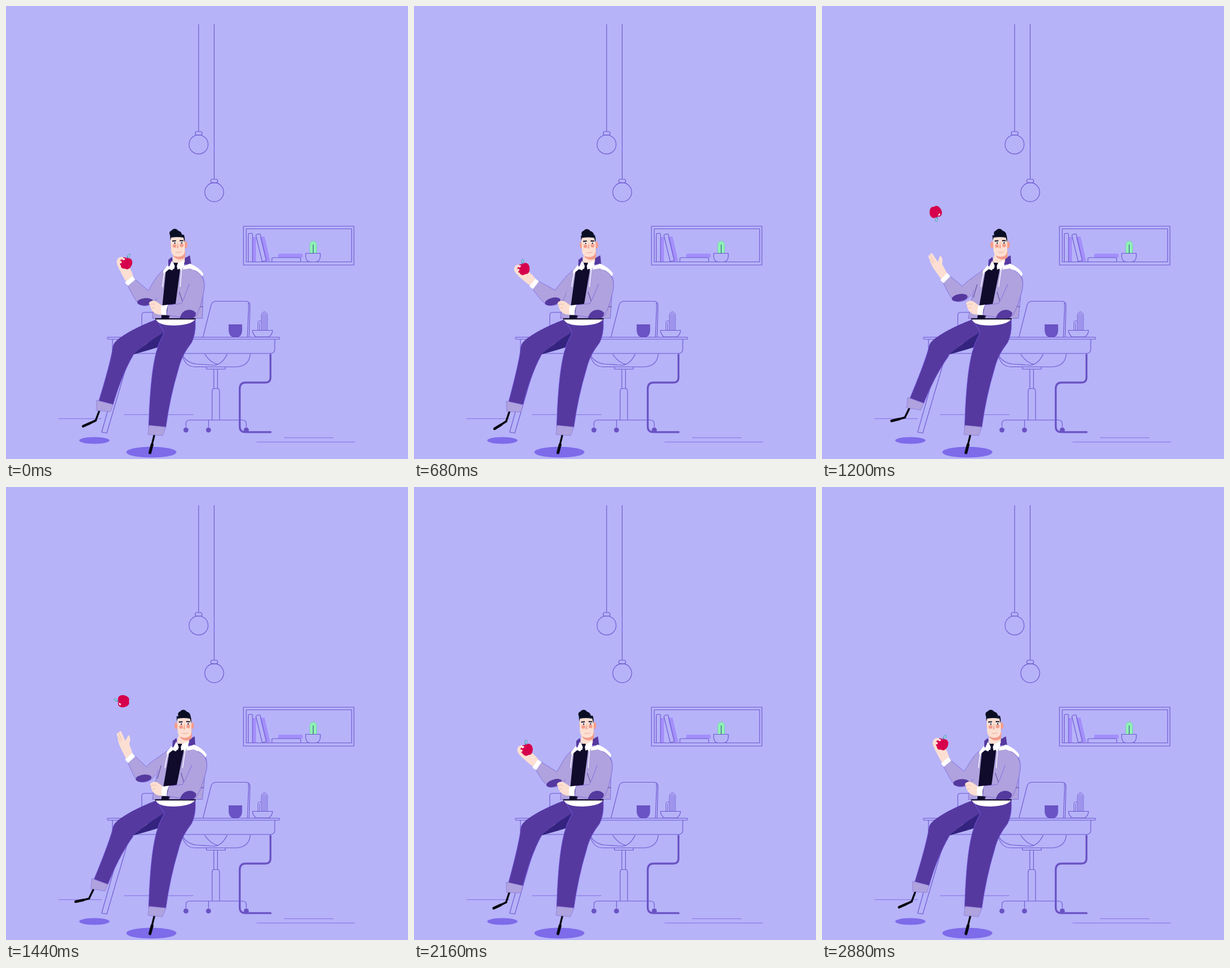
Recreate the animation shown at these times as an HTML page. Size 706x794 px, loop 2920 ms.

```html
<!DOCTYPE html>
<html lang="en">
<head>
<meta charset="utf-8">
<title>Apple toss</title>
<style>
  html, body { margin: 0; width: 100%; height: 100%; overflow: hidden; background: #b6b3f9; }
  svg { display: block; width: 100vw; height: 100vh; }
  .line { fill: none; stroke: #6f59d0; stroke-width: 1.15; stroke-linejoin: round; }
  .thin { fill: none; stroke: #8570e2; stroke-width: 1.1; }
  .solid { fill: #6a53c4; }
  .book { fill: #a48ffb; }
  .shade { fill: #7d6bea; }
  .pants { fill: #55399f; }
  .leg { fill: #55399f; stroke: #7659dd; stroke-width: .9; }
  .coat { fill: #afa2de; stroke: #7a62dd; stroke-width: .8; }
  .fold { fill: none; stroke: #4b3990; stroke-width: .9; }
  .hem { fill: #afa2de; stroke: #8d7bdb; stroke-width: .8; }
  .white { fill: #fff; }
  .skin { fill: #fcdfd2; }
  .blush { fill: #f39c8b; }
  .ink { fill: #100a2b; }
  .shoe { fill: none; stroke: #07060f; stroke-linecap: round; stroke-linejoin: round; }
  .finger { fill: none; stroke: #fcdfd2; stroke-width: 4.2; stroke-linecap: round; }
</style>
</head>
<body>
<svg viewBox="0 0 706 794" preserveAspectRatio="none">
  <rect width="706" height="794" fill="#b6b3f9"/>

  <!-- lamps -->
  <g class="line">
    <path d="M338.3 32V220M365.6 32V303.500"/>
    <rect x="332.300" y="220" width="12" height="6.500" rx="3"/>
    <circle cx="338.200" cy="242.700" r="16.700"/>
    <rect x="359.700" y="303.500" width="12" height="6.500" rx="3"/>
    <circle cx="365.700" cy="326.300" r="16.600"/>
  </g>

  <!-- shelf -->
  <path class="book" d="M433 405H439V448H433ZM446 405L454 404L464 447L457 448ZM480 434H519Q521 434 521 436V441H478V436Q478 434 480 434Z"/>
  <g class="line">
    <path d="M417 386H611V454H417ZM422 390.500H607V448.500H422Z"/>
    <path d="M425.500 448V401Q425.500 398.500 428 398.500H431Q433 398.500 433 401V448M439 403Q438.500 401 441 400.300L444 399.500Q446 399 446.700 401L457 446L450 448ZM467 448V443Q467 441 469 441H515Q517.500 441 517.500 443V448"/>
    <path d="M533.500 433.500V418A6 6 0 0 1 545.500 418V433.500" style="fill:#8ff2b6;stroke:#6fc9ae;stroke-width:.8"/>
    <path d="M539.500 418V433" style="stroke:#3e4f86"/>
    <path d="M526.300 433.500H552V439Q551 448.500 543 448.500H535Q527 448.500 526.300 439Z"/>
  </g>

  <!-- floor -->
  <path class="thin" d="M92 723.300H168M207 716.300H329M440 764.300H613M488 756.700H575"/>
  <ellipse class="shade" cx="155.200" cy="761.500" rx="26.500" ry="5.900"/>
  <ellipse class="shade" cx="255.300" cy="782" rx="44" ry="9.500"/>

  <!-- chair -->
  <g class="line">
    <path d="M346 580L360 525Q362 517.500 369 517.500H421Q428.500 517.500 428.500 525L427 580M425.500 520Q426.500 523 426 530L424 580"/>
    <path d="M309 610Q314 632.500 332 632.500H402Q427 632.500 429 610M309 610Q316 625 334 627.500L366 629.500Q380 628 388.500 610M349 610Q358 625 373 628.500"/>
    <path d="M352 633V636.500H385V633M365 637V671M371.500 637V671M362 725.500V675Q362 670.500 366 670.500H371Q375 670.500 375 675V725.500"/>
    <path d="M316 738V732Q316 725.700 323 725.700H415Q422 725.700 422 732V738M355.600 726V738"/>
  </g>
  <g class="solid">
    <circle cx="316" cy="743.200" r="4.400"/><circle cx="355.600" cy="743.200" r="4.400"/><circle cx="422" cy="743.200" r="4.400"/>
  </g>

  <!-- desk -->
  <g class="line">
    <rect x="178" y="580.500" width="302.500" height="3.500" rx="1.500"/>
    <path d="M187 584V609H464Q472 609 472 601V584"/>
    <path d="M207 609L168 747L177 748.500L218 609M238.500 580V542Q238.500 537 243.500 537H262"/>
    <path d="M433 568.500H468Q468 575 462 580H439Q433 575 433 568.500Z"/>
    <path style="stroke-width:.9" d="M442.500 568V554Q445.500 549 448.500 554V568M445.500 568V555M448.500 556V540Q453.700 532 459 540V568M451 568V541Q453.700 537 456.500 541V568M453.700 541V568"/>
    <path style="stroke:#6a53c4;stroke-width:3.300" d="M464.500 610V651Q464.500 660 455 660H421Q410.500 660 410.500 671V737Q410.500 746.800 420 746.800H466"/>
  </g>
  <path class="solid" d="M391 558H414.700V569Q414 580.500 405 580.500H401Q392 580.500 391 569Z"/>

  <!-- legs -->
  <g id="shin">
    <g id="foot">
      <path class="shoe" stroke-width="3.600" d="M157.500 726.500L148 731"/>
      <path class="shoe" stroke-width="4.600" d="M148 731L135.500 736.500"/>
    </g>
    <path class="shoe" stroke-width="3.400" d="M164 709L157.500 726.500"/>
    <path class="leg" d="M187.500 599C185 616 176 650 163 692L188 699C196 671 208 638 224 611L215 590Z"/>
    <path class="hem" d="M159 691L188 698.500L184 711L159 709Z"/>
  </g>
  <path class="leg" d="M266 549C236 560 205 576 193 588Q188 593 187.300 601"/>
  <path class="pants" d="M266 549C236 560 205 576 193 588C186 595 186 606 190 616Q206 620 223 611L246 592L280 573L300 552Z"/>
  <path fill="#34237f" d="M223 611Q244 592 279 571L271 597Z"/>
  <path class="shoe" stroke-width="3.300" d="M261 750L256 770"/>
  <path class="shoe" stroke-width="5" d="M256.500 769L252.800 783"/>
  <path class="leg" d="M264 549H332.500Q334 575 326 590C319 600 309 612 303 636Q288 685 280.500 740L250.500 738C252 690 255 640 264 606Q268 590 278 572Z"/>
  <path class="hem" d="M251 735L281 738L275 753L249.500 751Z"/>

  <!-- torso -->
  <g id="torso">
    <path class="white" d="M263 549H332Q327 558.500 297 560Q268 560.500 263 549Z"/>
    <path class="pants" d="M291 440L285 445L285 459L296 452ZM312 443L323 437L325.500 455L312 459Z"/>
    <path class="skin" d="M296 430H314L314 449L301 455L292 447Z"/>
    <path class="coat" d="M284 456C270 466 264 480 262 500L257 547.500H345L346 505C350 490 349 475 339 466L318 453Z"/>
    <path class="white" d="M291 447L286 459L290 466H304L313 456L313 448L300 454Z"/>
    <path class="ink" d="M281 462L291 459L299 463L306 460L298 521L285 549H272.500L275 521Z"/>
    <path class="white" d="M284 454L276 464L276.500 469.500L288 460ZM312 456L323 451.500Q339 458 346.500 469L345 474Q335 464 323 460L310 462Z"/>
    <path class="white" d="M290 450L286 461L292 463.500L298 453ZM299 452L306 462L313 454L312 446Z"/>
    <path class="ink" d="M294 450H302L300 456L302 466H294L296.500 456Z"/>
    <path class="ink" d="M262 547.300H333V549.500H262Z"/>
    <path class="fold" d="M268 488L263 511M304 501L311 520M336 527H346"/>
    <path d="M279 465Q276 477 275 492M308.500 461Q307 477 306 492" fill="none" stroke="#fff" stroke-width="1.300" stroke-linecap="round"/>
  </g>

  <!-- head -->
  <g id="head">
    <ellipse id="ear" class="blush" cy="418.500" rx="3.200" ry="5.500"/>
    <ellipse class="blush" cx="315.300" cy="418.500" rx="3.300" ry="6"/>
    <path class="blush" d="M293 434L315 428L314.500 441Q305 448 295 440Z"/>
    <path class="skin" d="M288.700 403H314V429C314 436 309 439.500 302.500 439.500C295 439.500 291 436 290 429Z"/>
    <circle class="blush" cx="296" cy="420.500" r="3.300"/>
    <circle class="blush" cx="308.500" cy="419.500" r="3.300"/>
    <path d="M302 413L300 424L303 425Z" fill="#f3a58f"/>
    <path d="M298 431.500Q303 433 308 431" fill="none" stroke="#e9a18f" stroke-width=".9"/>
    <circle class="white" cx="296.500" cy="415.300" r="2"/><circle class="white" cx="308.500" cy="415" r="2"/>
    <circle class="ink" cx="296.500" cy="415.500" r="1.200"/><circle class="ink" cx="308.500" cy="415.200" r="1.200"/>
    <path d="M292 412L298.500 411.500M305 411.200L311.500 411.500" stroke="#0f1128" stroke-width="2"/>
    <path fill="#0f1630" d="M288.700 411L288 402Q300 399 312.500 401Q314 404 314 410L313.500 414L311.500 406Q301 404 290 406Z"/>
    <path id="quiff" fill="#0a0e22" d="M289 403C285 398 288 394 291 393.500C293 389.500 300 389 302.500 394C307 395 309 398 309 402Q299 405 289 403Z"/>
  </g>

  <!-- raised arm -->
  <path id="sleeve" class="coat"/>
  <ellipse id="patch" class="pants" rx="14" ry="6.400"/>
  <g id="palm">
    <path id="closed" class="skin" d="M-2-7.500C-10-9-18-9-22-8C-26-3-34 3-43-4C-48 1-45 7-38 9C-28 10-14 9-2 7Z"/>
    <g id="open">
      <path class="skin" d="M-2-7C-12-8-18-8-24-9C-28-13.500-33-15.500-37.500-14C-38-12-33-9-31-4.500L-48-4.500C-51-4-51-1.500-48 .3C-51 2.500-48 5-43 5C-37 7.500-32 7.500-26 8C-18 8-10 7.500-2 7Z"/>
      <path d="M-48 .3L-33 .8M-43 4L-33 4" fill="none" stroke="#eab9aa" stroke-width=".8"/>
    </g>
  </g>
  <g id="apple">
    <path d="M0-7Q0-11 1.500-14" fill="none" stroke="#3b3a68" stroke-width="1.200"/>
    <path d="M1-9Q-1-15 3.500-17Q7-13 1-9Z" fill="#8fd6dc" stroke="#5d7fb5" stroke-width=".7"/>
    <path d="M0-8C5-11.500 11-8 10.800-1C10.500 6 6 11 2.500 10.300Q0 9.500-2.500 10.300C-6 11-10.500 6-10.800-1C-11-8-5-11.500 0-8Z" fill="#d6004c"/>
    <ellipse cx="-5" cy="-6" rx="2.200" ry="1.400" fill="#fff" transform="rotate(-30 -5 -6)"/>
  </g>
  <g id="grip">
    <path class="finger" d="M-39 7Q-45 3-42-3M-34 8Q-39 6-37 2.500M-28 8L-31 6.500"/>
  </g>
  <path id="cuff" class="white" d="M-4-8.500H4V8.500H-4Z"/>

  <!-- folded arm -->
  <g id="folded">
    <path class="skin" d="M274 525L264 518Q258 514.500 252 519Q250 522 253 525Q254 533 261 538Q266 541.500 274 541Z"/>
    <path d="M252 524Q257 521 262 523M255 530L261 528" fill="none" stroke="#eab9aa" stroke-width=".9"/>
    <path class="coat" d="M330 463C344 468 350 482 348 496C345 515 341 530 334 543C328 548 318 548 282 541.500L284 524L308 521.500C314 510 318 497 322 487"/>
    <path class="pants" d="M305.500 547C308 532 325 528 333.500 538Q333 546 328 547Q318 549 305.500 547Z"/>
    <path class="white" d="M273 525L284.500 523.500Q281 533 282 541.700L273 541.500Q271 533 273 525Z"/>
  </g>
</svg>
<script>
const LOOP = 2920, STEP = 40, THROW = 680, CATCH = 1740;

// time, shin, foot, sway, head x, head y, turn, wrist x, wrist y, forearm, hand, elbow x, elbow y
const POSES = [
  [0, 0, 0, 0, 0, 0, 0, 218, 482, 50, 67, 246.5, 512.5],
  [360, -9.4, -11, -2, -1.5, 2.5, 0, 212, 521, 0, 0, 248.5, 523],
  [680, -2, -6, 3.5, 5, 0.6, 0.6, 211, 487, 38, 45, 245, 512],
  [960, 2.3, -4, 6, 9, 0, 1, 215, 481, 40, 45, 244.5, 506.5],
  [1280, 6, 6, 7, 11.5, 0, 1, 217, 476, 46, 61, 243.5, 505],
  [1440, 5.5, 6, 7, 11.5, 0, 1, 218, 475, 47, 66, 243.5, 504.5],
  [1760, -0.7, 2, 6, 9, 1, 1, 216, 481, 50, 61, 244.5, 507.5],
  [2160, -1.9, 1, 0, 1.5, 0, 0, 216, 487, 35, 46, 247.5, 513],
  [2800, 0, 0, 0, 0, 0, 0, 218, 482, 50, 67, 246.5, 512.5]
];
// time, x, spin
const FLIGHT = [[THROW, 192, -17], [960, 193, 60], [1440, 206, 270], [CATCH, 207, 362]];

const el = Object.fromEntries([...document.querySelectorAll('[id]')].map(n => [n.id, n]));
const set = (name, value, attr = 'transform') => el[name].setAttribute(attr, value);
const show = (name, on) => set(name, on ? 'visible' : 'hidden', 'visibility');
const rad = deg => deg * Math.PI / 180;

// Monotone cubic through the rows; returns every column at time t.
function sample(rows, t) {
  const last = rows.length - 1;
  t = Math.min(Math.max(t, rows[0][0]), rows[last][0]);
  let i = 0;
  while (i < last - 1 && t >= rows[i + 1][0]) i++;
  const h = rows[i + 1][0] - rows[i][0], u = (t - rows[i][0]) / h;
  return rows[0].map((_, c) => {
    const slope = k => (rows[k + 1][c] - rows[k][c]) / (rows[k + 1][0] - rows[k][0]);
    const tangent = k => {
      if (k < 1 || k >= last) return 0;
      const a = slope(k - 1), b = slope(k);
      return a * b > 0 ? 2 * a * b / (a + b) : 0;
    };
    const p = rows[i][c], q = rows[i + 1][c];
    return p + (q - p) * u * u * (3 - 2 * u)
      + h * u * (1 - u) * ((1 - u) * tangent(i) - u * tangent(i + 1));
  });
}

// Point at local (x, y) of a frame placed at (ox, oy) and turned by deg.
function place(ox, oy, deg, x, y) {
  const c = Math.cos(rad(deg)), s = Math.sin(rad(deg));
  return [ox + x * c - y * s, oy + x * s + y * c];
}

function drawArm(wx, wy, fore, ex, ey, lean) {
  const [ix, iy] = [ex + 3, ey - 14], [ox, oy] = [ex - 3, ey + 13];
  const [ax, ay] = place(wx, wy, fore, 3, -8.5), [bx, by] = place(wx, wy, fore, 3, 8.5);
  const sx = 276 + lean;
  set('sleeve', `M${sx} 463C${sx - 13} 473 ${ix + 7} ${iy - 9} ${ix} ${iy}L${ax} ${ay}L${bx} ${by}`
    + `C${(bx + ox) / 2 - 3} ${(by + oy) / 2 + 4} ${ox - 13} ${oy} ${ox} ${oy}`
    + `C${ox + 10} ${oy} ${ox + 17} ${oy - 6} ${ox + 22} ${oy - 13}`, 'd');
  set('patch', `translate(${ox + 3 - fore * 0.04} ${oy - 7}) rotate(${fore * 0.8 - 45})`);
  set('cuff', `translate(${wx} ${wy}) rotate(${fore})`);
}

function drawApple(t, wx, wy, hand) {
  const flying = t > THROW && t < CATCH;
  let x, y, spin;
  if (flying) {
    [, x, spin] = sample(FLIGHT, t);
    y = 361 + 0.000326 * (t - 1229) ** 2;
  } else {
    [x, y] = place(wx, wy, hand, -31.7, -5.6);
    spin = hand * 1.28 - 75;
  }
  set('apple', `translate(${x} ${y}) rotate(${spin})`);
  show('open', flying);
  show('closed', !flying);
  show('grip', !flying);
}

function draw(t) {
  const [, shin, foot, sway, hx, hy, turn, wx, wy, fore, hand, ex, ey] = sample(POSES, t);
  const k = sway / 93, shear = `matrix(1 0 ${-k} 1 ${548 * k} 0)`;
  set('shin', `rotate(${shin} 205 602)`);
  set('foot', `rotate(${foot} 157.5 726.5)`);
  set('torso', shear);
  set('folded', shear);
  set('head', `translate(${hx} ${hy})`);
  set('ear', 287.5 + 4.5 * (1 - turn), 'cx');
  set('quiff', `translate(${3.5 * turn} 0)`);
  drawArm(wx, wy, fore, ex, ey, 85 * k);
  const palm = `translate(${wx} ${wy}) rotate(${hand})`;
  set('palm', palm);
  set('grip', palm);
  drawApple(t, wx, wy, hand);
}

function tick() {
  draw(Math.floor(performance.now() % LOOP / STEP) * STEP);
  requestAnimationFrame(tick);
}
tick();
</script>
</body>
</html>
```
